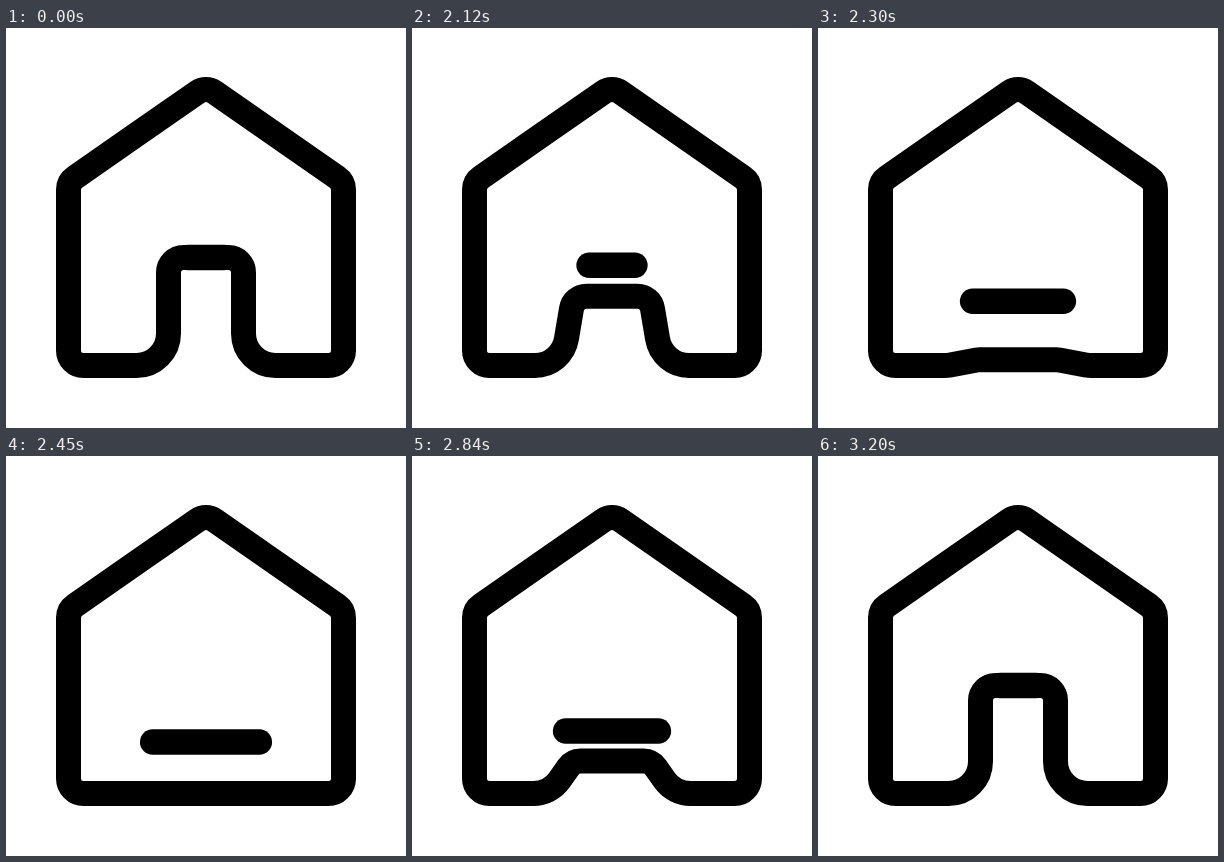
Animation, 400 px wide and 400 px high, one loop 3260 ms. Source, as an HTML page with a canvas:

```html
<!DOCTYPE html>
<html lang="en">
<head>
<meta charset="utf-8">
<title>Home icon</title>
<style>
  html, body { margin: 0; height: 100%; overflow: hidden; background: #fff; }
  canvas { display: block; width: 100vw; height: 100vh; }
</style>
</head>
<body>
<canvas width="400" height="400"></canvas>
<script>
const ctx = document.querySelector('canvas').getContext('2d');
const LOOP = 3260, DOOR_TOP = 229.5, FLOOR = 337.5, BAR_LOW = 287.5;
const lerp = (a, b, k) => a + (b - a) * k;

// Ease along cubic-bezier(x1, 0, x2, 1), solved by bisection.
function ease(p, x1, x2) {
  if (p <= 0) return 0;
  if (p >= 1) return 1;
  let lo = 0, hi = 1, s;
  for (let i = 0; i < 24; i++) {
    s = (lo + hi) / 2;
    const x = 3 * (1 - s) ** 2 * s * x1 + 3 * (1 - s) * s * s * x2 + s ** 3;
    if (x < p) lo = s; else hi = s;
  }
  return s * s * (3 - 2 * s);
}

const step = (t, start, duration, x1, x2) => ease((t - start) / duration, x1, x2);

function drawHouse(shut) {
  const top = lerp(DOOR_TOP, FLOOR, shut);
  const foot = lerp(162.5, 127.5, shut);
  const head = lerp(162.5, 160, shut);
  const corners = [
    [200, 58.2, 15], [337.5, 153.9, 15], [337.5, FLOOR, 15],
    [400 - foot, FLOOR, 32], [400 - head, top, 15],
    [head, top, 15], [foot, FLOOR, 32],
    [62.5, FLOOR, 15], [62.5, 153.9, 15]
  ];
  ctx.beginPath();
  ctx.moveTo(131.25, 106.05);
  corners.forEach(([x, y, r], i) => {
    const [nextX, nextY] = corners[(i + 1) % corners.length];
    ctx.arcTo(x, y, nextX, nextY, r);
  });
  ctx.closePath();
  ctx.lineWidth = 25;
  ctx.stroke();
  return top;
}

function drawBar(y) {
  const half = 18 + 0.625 * (y - DOOR_TOP);
  ctx.beginPath();
  ctx.moveTo(200 - half, y);
  ctx.lineTo(200 + half, y);
  ctx.lineWidth = 25.5;
  ctx.stroke();
}

function draw(now) {
  const t = now % LOOP;
  const shut = step(t, 2000, 420, 0.38, 0.2) - step(t, 2681, 500, 0.41, 0.36);
  const drop = step(t, 2000, 540, 0.41, 0.36) - step(t, 2600, 600, 0.57, 0.65);
  ctx.clearRect(0, 0, 400, 400);
  ctx.lineCap = 'round';
  const top = drawHouse(shut);
  // The rising door catches the bar and carries it along.
  drawBar(Math.min(top, lerp(DOOR_TOP, BAR_LOW, drop)));
  requestAnimationFrame(draw);
}
requestAnimationFrame(draw);
</script>
</body>
</html>
```
